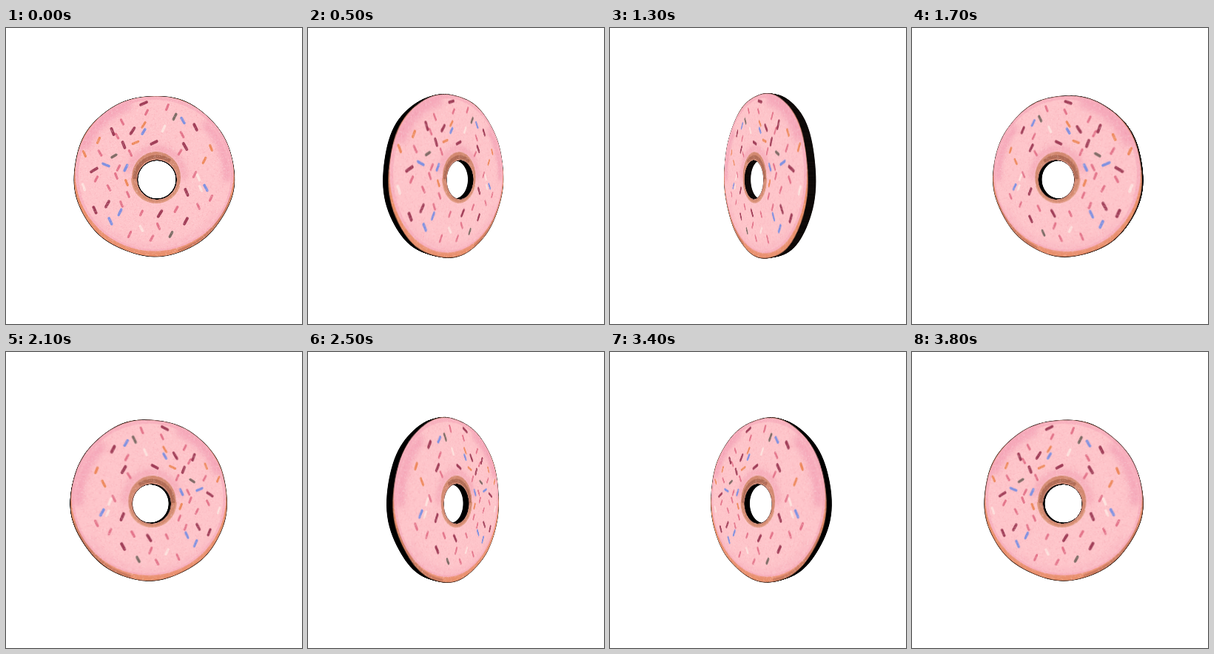
Write an HTML page with a canvas that moves like this. It is 400 px wide and 400 px high and loops after 3900 ms.

```html
<!DOCTYPE html>
<html lang="en">
<head>
<meta charset="utf-8">
<title>Spinning donut</title>
<style>
html, body { margin: 0; width: 100%; height: 100%; overflow: hidden; background: #fff; }
canvas { display: block; width: 400px; height: 400px; }
</style>
</head>
<body>
<canvas id="stage" width="400" height="400"></canvas>
<script>
const SIZE = 400, MID = 200, TAU = Math.PI * 2;
const STEP = 100, STEPS = 39;
const CAMERA = 342, HALF = 5;
const ZOOM = CAMERA / (CAMERA - HALF); // face scale when seen head-on
const RADIUS = 108.2;
const HOLE = { x: 204, y: 205, r: 27 };

const ctx = document.getElementById('stage').getContext('2d');

let seed = 11;
function random() {
  seed = (seed * 16807) % 2147483647;
  return seed / 2147483647;
}

function makeCanvas(width, height) {
  const canvas = document.createElement('canvas');
  canvas.width = width;
  canvas.height = height;
  return canvas;
}

const edge = a => RADIUS + 0.5 * Math.sin(5 * a + 1) + 0.4 * Math.sin(9 * a);

function outline(centerX, centerY, radius) {
  return Array.from({ length: 120 }, (_, i) => {
    const a = i / 120 * TAU, r = radius(a);
    return [centerX + r * Math.cos(a), centerY + r * Math.sin(a)];
  });
}

// The body is slightly larger than the face, which leaves a thin dark contour.
const rim = outline(MID, MID, edge);
const bodyRim = outline(MID, MID, a => edge(a) + 0.5);
const bore = outline(HOLE.x, HOLE.y, () => HOLE.r);
const bodyBore = outline(HOLE.x, HOLE.y, () => HOLE.r - 0.5);

function trace(target, points) {
  points.forEach(([x, y], i) => i ? target.lineTo(x, y) : target.moveTo(x, y));
  target.closePath();
}

// Sprinkle centres as x, y pairs, grouped by colour and lean.
const sprinkles = [
  { color: '#e4758b', width: 3.2,
    rising: [218,107, 190,114, 235,168, 152,189, 122,204, 255,198, 277,230, 230,245, 183,250, 167,279, 197,284],
    falling: [157,127, 238,144, 150,146, 168,169, 127,169, 149,200, 139,216, 165,225, 260,241, 206,268, 156,238] },
  { color: '#fde3df', width: 3.4,
    rising: [213,136], falling: [260,202, 105,215, 183,271, 263,217] },
  { color: '#ee8a5c', width: 3.2,
    rising: [186,131, 268,179, 125,152], falling: [277,162, 106,170, 163,209], flat: [175,155] },
  { color: '#7d6d66', width: 3.4, rising: [228,120, 223,279], flat: [146,173] },
  { color: '#8092e2', width: 3.6,
    rising: [186,140, 162,189, 154,249], falling: [239,125, 270,216, 141,261], flatFalling: [135,185] },
  { color: '#a03e58', width: 3.9,
    rising: [171,139, 137,238, 208,251, 243,261],
    falling: [256,134, 144,140, 159,158, 242,160, 120,246, 244,222],
    flat: [186,102, 200,155, 119,192] }
];
const leans = { rising: -62, falling: 64, flat: -27, flatFalling: 25 };

function drawSprinkles(g) {
  g.lineCap = 'round';
  for (const group of sprinkles) {
    g.strokeStyle = group.color;
    g.lineWidth = group.width;
    for (const lean in leans) {
      const spots = group[lean] || [];
      for (let i = 0; i < spots.length; i += 2) {
        const a = (leans[lean] + random() * 10 - 5) * Math.PI / 180;
        const half = group.width + random() * 0.8;
        const dx = half * Math.cos(a), dy = half * Math.sin(a);
        g.beginPath();
        g.moveTo(spots[i] - dx, spots[i + 1] - dy);
        g.lineTo(spots[i] + dx, spots[i + 1] + dy);
        g.stroke();
      }
    }
  }
}

function arc(g, color, width, x, y, r, from, to) {
  g.strokeStyle = color;
  g.lineWidth = width;
  g.beginPath();
  g.arc(x, y, r, from * TAU, to * TAU);
  g.stroke();
}

function disc(g, color, x, y, rx, ry) {
  g.fillStyle = color;
  g.beginPath();
  g.ellipse(x, y, rx, ry, 0, 0, TAU);
  g.fill();
}

function makeFace() {
  const face = makeCanvas(SIZE, SIZE), g = face.getContext('2d');
  g.beginPath();
  trace(g, rim);
  trace(g, bore);
  g.clip('evenodd');

  // Dough, then icing shifted up so the dough shows along the lower edge.
  g.fillStyle = '#e98f68';
  g.fillRect(0, 0, SIZE, SIZE);
  arc(g, '#c9785a', 3, MID, MID, 106, 0.04, 0.2);
  disc(g, '#f9b2bf', 200.5, 196.5, 107, 105);
  disc(g, '#fec5ca', 201, 198, 103, 101);

  g.filter = 'blur(4px)';
  arc(g, '#f4a3b7', 10, MID, MID, 101, 0.56, 0.7);
  arc(g, '#f4a3b7', 10, MID, MID, 99, 0.87, 1.01);
  arc(g, '#f8b0be', 4, MID, 196, 101, 0.08, 0.4);
  arc(g, '#f3a0b2', 6, 203, 200, 37, 0.52, 1.02);
  g.filter = 'none';

  disc(g, '#d38a70', 203, 202, 33, 35);
  arc(g, '#b06c55', 5, 204, 204, 30, 0.5, 0.85);
  arc(g, '#e09a80', 2, 203, 203, 33, 0.05, 0.5);
  drawSprinkles(g);

  for (let i = 0; i < 9000; i++) {
    g.fillStyle = random() < 0.55 ? 'rgba(255,232,230,.25)' : 'rgba(228,125,150,.13)';
    g.fillRect(90 + random() * 220, 90 + random() * 220, 1.2, 1.2);
  }
  return face;
}

function makeStripes() {
  const strip = makeCanvas(1, SIZE), g = strip.getContext('2d');
  for (let y = 0; y < SIZE; y++) {
    const v = 0.65 + random() * 0.5;
    g.fillStyle = `rgb(${118 * v}, ${83 * v}, ${73 * v})`;
    g.fillRect(0, y, 1, 1);
  }
  return ctx.createPattern(strip, 'repeat');
}

const face = makeFace();
const stripes = makeStripes();

function projector(cos, sin, height) {
  return ([px, py]) => {
    const x = (px - MID) / ZOOM, y = (py - MID) / ZOOM;
    const scale = CAMERA / (CAMERA + x * sin - height * cos);
    return [MID + (x * cos + height * sin) * scale, MID + y * scale];
  };
}

function drawSide(cos, sin, front) {
  const glow = Math.max(0, Math.min(1, (0.55 - Math.abs(cos)) / 0.35));
  for (let i = -10; i <= 10; i++) {
    const project = projector(cos, sin, front * i / 10);
    ctx.beginPath();
    trace(ctx, bodyRim.map(project));
    trace(ctx, bodyBore.map(project));
    ctx.fillStyle = '#000';
    ctx.fill('evenodd');
    ctx.globalAlpha = glow;
    ctx.fillStyle = stripes;
    ctx.fill('evenodd');
    ctx.globalAlpha = 1;
  }
}

// A vertical turn keeps columns upright, so each one is just a scaled strip.
function drawFace(cos, sin, height) {
  const source = column => {
    const offset = column - MID;
    return (offset * (CAMERA - height * cos) - CAMERA * height * sin) /
           (CAMERA * cos - offset * sin);
  };
  for (let column = 80; column < 320; column++) {
    const x = source(column + 0.5);
    if (Math.abs(x) > RADIUS / ZOOM + 1) continue;
    const a = source(column), b = source(column + 1);
    const width = Math.min(Math.abs(b - a) * ZOOM, 30);
    const tall = SIZE / ZOOM * CAMERA / (CAMERA + x * sin - height * cos);
    ctx.drawImage(face, MID + x * ZOOM - width / 2, 0, width, SIZE,
                  column, MID - tall / 2, 1, tall);
  }
}

function draw(step) {
  const angle = step / STEPS * TAU;
  const cos = Math.cos(angle), sin = Math.sin(angle);
  const front = cos > 0 ? HALF : -HALF;
  ctx.fillStyle = '#fff';
  ctx.fillRect(0, 0, SIZE, SIZE);
  drawSide(cos, sin, front);
  drawFace(cos, sin, front);
}

let shown = -1;
const start = performance.now();
function tick() {
  const step = Math.floor((performance.now() - start) / STEP) % STEPS;
  if (step !== shown) draw(shown = step);
  requestAnimationFrame(tick);
}
tick();
</script>
</body>
</html>
```
